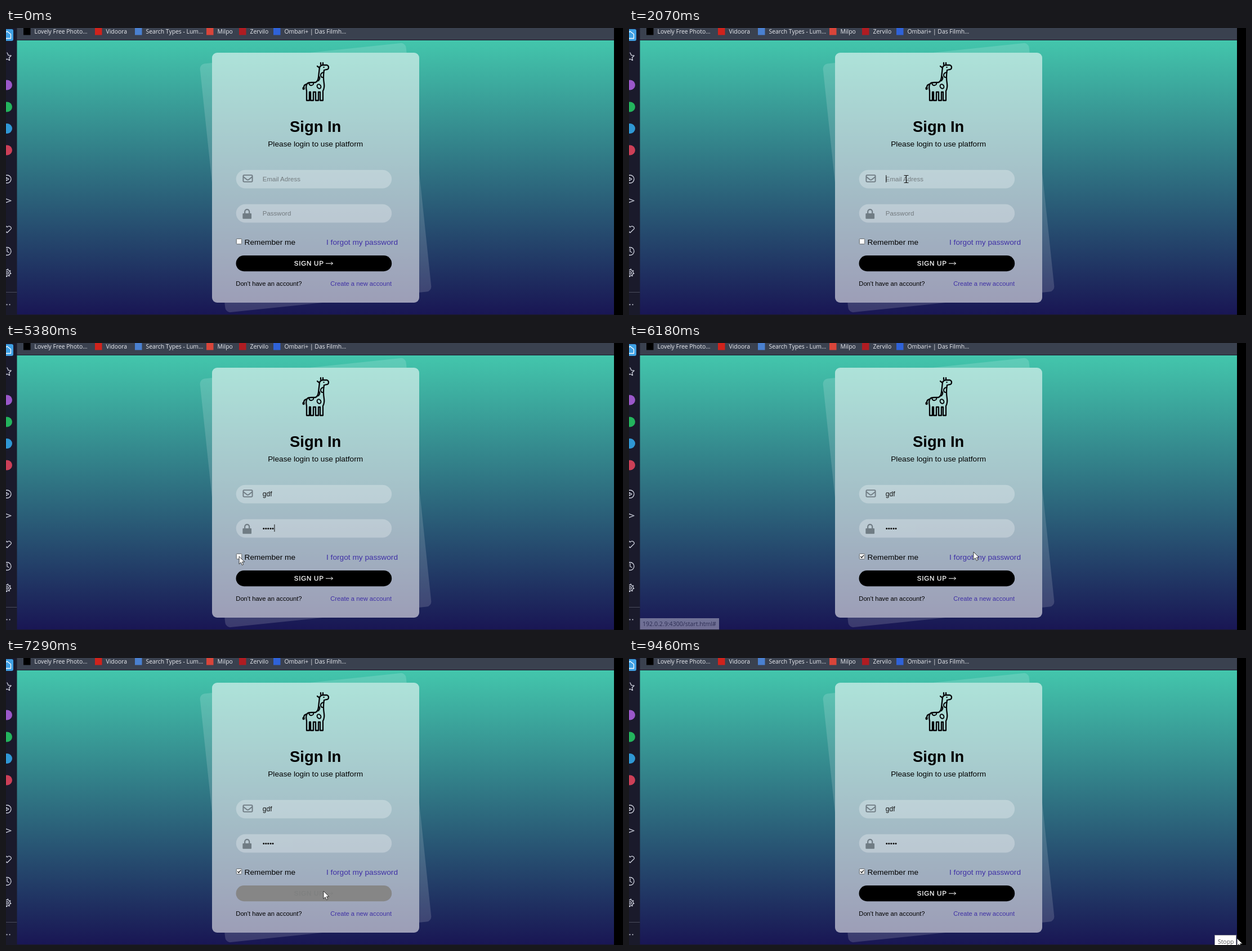
Animation, 1096 px wide and 511 px high, one loop 9560 ms. Source, as an HTML page:

```html
<!DOCTYPE html>
<html lang="en">
<head>
<meta charset="utf-8">
<title>Sign In</title>
<style>
html, body { margin: 0; width: 100%; height: 100%; overflow: hidden; background: #000; }
svg { display: block; width: 1096px; height: 511px; font-family: "Liberation Sans", Arial, sans-serif; }
.ui { font-family: "Open Sans", "Noto Sans", sans-serif; font-size: 10.4px; }
.small { font-size: 11.2px; }
.mid { font-size: 13.7px; }
.field { font-size: 11.5px; }
.hint { fill: #727a7e; }
.link { fill: #3f30a6; }
.line { fill: none; stroke: #cfd2de; stroke-width: 1.3; stroke-linejoin: round; stroke-linecap: round; }
#button { fill: #000; color: #fff; }
#button.on { fill: #868686; color: #7f8080; }
#label { fill: currentColor; stroke: currentColor; }
.link.on { text-decoration: underline; }
</style>
</head>
<body>
<svg viewBox="0 0 1096 511">
  <defs>
    <linearGradient id="sea" gradientUnits="userSpaceOnUse" x1="0" y1="22" x2="0" y2="510">
      <stop stop-color="#43c6ac"/><stop offset="1" stop-color="#191654"/>
    </linearGradient>
  </defs>

  <!-- page -->
  <rect x="19" width="1061" height="511" fill="#1a1a2b"/>
  <rect x="19" y="22" width="1061" height="488" fill="url(#sea)"/>
  <rect x="366" y="44" width="368" height="445" rx="9" fill="#fff" opacity=".15" transform="rotate(-6 550 266.5)"/>
  <rect x="366" y="44" width="368" height="445" rx="9" fill="url(#sea)"/>
  <rect x="366" y="44" width="368" height="445" rx="9" fill="#fff" opacity=".57"/>

  <!-- giraffe -->
  <g fill="none" stroke="#050508" stroke-width="2.3" stroke-linejoin="round" stroke-linecap="round">
    <path d="M557 70Q559 66 563 66L570 66Q573 67 573 70Q573 74 569 74L565 75Q563 88 565 99Q566 107 563 112V129H558V114H555V129H550V114H546V129H541V114H539V129H534V112Q532 104 535 99Q537 97 542 97H549Q554 96 555 88Z"/>
    <path d="M559 65V62M563 65V62M557 71L553 68M534 100Q529 101 529 106"/>
    <path d="M538 98Q539 103 543 102T546 98M564 79Q559 80 559 84T563 88M556 86Q559 90 555 94" stroke-width="2"/>
    <ellipse cx="556" cy="104" rx="3.2" ry="4" stroke-width="2" transform="rotate(-30 556 104)"/>
    <ellipse cx="528.6" cy="107.5" rx="1" ry="1.6"/>
    <path d="M564.5 70h.1"/>
  </g>

  <!-- form -->
  <text x="549.7" y="185.3" text-anchor="middle" font-size="27.4" font-weight="700">Sign In</text>
  <text x="549.7" y="211" text-anchor="middle" class="mid">Please login to use platform</text>
  <g fill="#fff" opacity=".27">
    <rect class="input" x="408.7" y="252.8" width="276.4" height="32.6" rx="16.3"/>
    <rect class="input" x="408.7" y="313.8" width="276.4" height="32.6" rx="16.3"/>
  </g>
  <g fill="none" stroke="#707c84" stroke-width="1.9" stroke-linejoin="round">
    <rect x="421.4" y="261.9" width="16.2" height="12" rx="1.8"/>
    <path d="M421.6 264.9L428 270Q429.5 271 431 270L437.4 264.9"/>
    <path d="M424.2 331v-3.8a4 4 0 0 1 8 0V331" stroke-width="2.2"/>
    <rect x="421.3" y="331" width="13.8" height="7.8" fill="#707c84"/>
  </g>
  <g class="field">
    <text id="mailHint" class="hint" x="455.8" y="272.6">Email Adress</text>
    <text id="passHint" class="hint" x="455.8" y="333.6">Password</text>
    <text id="mail" x="455.8" y="272.6" font-size="12" fill="#111"></text>
    <text id="pass" x="455.8" y="333.6" fill="#111"></text>
    <rect id="caret" width="1" height="13" fill="#111"/>
  </g>
  <rect x="409.3" y="375.3" width="9.4" height="9.4" rx="1" fill="#fff" stroke="#5f6468"/>
  <path id="tick" d="M411.3 380l2 2.2 3.8-4.6" fill="none" stroke="#111" stroke-width="1.3"/>
  <text x="423.5" y="386" class="mid">Remember me</text>
  <text x="569" y="386" class="mid link">I forgot my password</text>
  <g id="button">
    <rect x="408.5" y="405" width="276.7" height="28.2" rx="14.1"/>
    <g id="label">
      <text x="511.8" y="422.7" class="field" letter-spacing=".8" stroke-width=".3">SIGN UP</text>
      <path d="M568 419.2H580.4M577.4 416.6L580.6 419.2L577.4 421.8" fill="none"/>
    </g>
  </g>
  <text x="408.3" y="459" class="small">Don't have an account?</text>
  <text x="576.2" y="459" class="small link">Create a new account</text>

  <!-- status line -->
  <g id="status" class="ui">
    <rect x="19" y="490" width="141" height="20" fill="#fff"/>
    <text x="24" y="504.3" font-size="10.6" fill="#46494d">192.0.2.9:4300/start.html#</text>
  </g>

  <!-- bookmarks -->
  <rect x="19" width="1061" height="21" fill="#3a414f"/>
  <g id="marks" class="ui" fill="#e9ebf0"></g>

  <!-- sidebar -->
  <rect width="19.5" height="511" fill="#1a1a2b"/>
  <rect x="-8" y="2" width="21" height="21" rx="3" fill="#3fa0e4"/>
  <g class="line">
    <path d="M-5 11L2 6L8.5 11V18.5H-5Z" stroke="#fff"/>
    <path d="M2 44L4.2 48.6L9.2 49.2L5.5 52.7L6.5 57.6L2 55.2L-3 57.6V49"/>
    <circle cx="2" cy="269" r="7"/><path d="M0 266L5 269L0 272Z"/>
    <path d="M-6 302L9 307.5L-6 313Z"/>
    <path d="M2 364.5L-5 358V353Q-1 351 2 354.5Q5 351.5 8 354T7.6 359Z"/>
    <circle cx="2" cy="397.5" r="7"/><path d="M2 393V398L5 399.5"/>
    <circle cx="2" cy="436" r="2.2"/><circle cx="2" cy="436" r="5.4"/>
    <circle cx="2" cy="436" r="6.6" stroke-width="1.6" stroke-dasharray="2 3.2" stroke-linecap="butt"/>
    <path d="M0 470.5H19" stroke="#4a4b5c" stroke-width="1"/>
    <path d="M1.5 492.5h.1M6.5 492.5h.1" stroke-width="2"/>
  </g>
  <circle cx="2" cy="101.5" r="9" fill="#9a57c9"/>
  <circle cx="2" cy="140.5" r="9" fill="#23b45d"/>
  <circle cx="2" cy="179" r="9" fill="#2f97d4"/>
  <circle cx="2" cy="217.5" r="9" fill="#cc3f57"/>
  <rect x="1080" width="16" height="511"/>

  <!-- tooltip and pointer -->
  <g id="tip" class="ui">
    <rect x="1040.5" y="493.5" width="38" height="20" fill="#fff" stroke="#8a8a92"/>
    <text x="1046" y="509.3" fill="#5a5a5e">Stopp</text>
  </g>
  <g id="pointer" stroke-linejoin="round">
    <path id="arrow" d="M0 0V13.6L3.2 10.7L5.3 15.5L7.6 14.5L5.5 9.8H9.8Z" fill="#fff" stroke="#111" stroke-width=".8"/>
    <path id="beam" d="M-4 -6.5H-1L0 -5.7L1 -6.5H4M0 -5.7V5.7M-4 6.5H-1L0 5.7L1 6.5H4" fill="none" stroke="#111" stroke-width="1.2"/>
    <path id="hand" d="M-1.5 .8Q-1.5 -.8 0 -.8T1.5 .8V6Q3 5 4 6.3Q5.5 5.6 6.3 7Q8 6.5 8 8.5V11Q8 14 6 16H-.5Q-3 12 -4.6 9.8Q-5 8 -3.3 8L-1.5 9.8Z" fill="#fff" stroke="#111" stroke-width=".9"/>
  </g>
</svg>
<script>
const LOOP = 9560, ENTER = 510;
const FOCUS_MAIL = 2070, TYPE_G = 3070, TYPE_DF = 3300;
const FOCUS_PASS = 4170, TYPE_PASS = 4550, KEY_GAP = 80;
const BLUR = 5390, CHECK = 5470, BLINK = 535, LINGER = 160, TIP = 9240;

const $ = id => document.getElementById(id);
const all = sel => [...document.querySelectorAll(sel)];
const clamp = v => Math.max(0, Math.min(1, v));
const show = (el, on) => el.setAttribute("visibility", on ? "visible" : "hidden");

const marks = [
  [31, "#000", "Lovely Free Photo..."],
  [158, "#d0231c", "Vidoora"],
  [229, "#4a80d0", "Search Types - Lum..."],
  [356, "#d9453a", "Milpo"],
  [414, "#b01c22", "Zervilo"],
  [475, "#2f62d8", "Ombari+ | Das Filmh..."]
];
$("marks").innerHTML = marks.map(([x, fill, name]) =>
  `<rect x="${x}" width="12.5" height="12.5" fill="${fill}"/><text x="${x + 19.5}" y="10">${name}</text>`).join("");

// each glide eases to a stop; arc bows the way up (negative) or down
const entry = { x: 1075, y: 500 };
const glides = [
  { from: ENTER, to: 1450, x: 484, y: 225, arc: -225 },
  { from: 1480, to: 1920, x: 492.5, y: 269 },
  { from: 2150, to: 2460, x: 492.5, y: 275 },
  { from: 3480, to: 4230, x: 507, y: 332, arc: 40 },
  { from: 4900, to: BLUR, x: 414, y: 380 },
  { from: 5540, to: 5950, x: 630, y: 383 },
  { from: 5960, to: 6130, x: 612, y: 372 },
  { from: 6400, to: 6910, x: 564, y: 415 },
  { from: 7290, to: 7690, x: 638, y: 449.5 },
  { from: 7990, to: 8860, x: 1080, y: 499, arc: -450 }
];

function pointerAt(t) {
  let { x, y } = entry;
  for (const g of glides) {
    const u = clamp((t - g.from) / (g.to - g.from));
    const k = u * u * (3 - 2 * u);
    x += (g.x - x) * k;
    y += (g.y - y) * k + (g.arc || 0) * 4 * k * (1 - k);
  }
  return { x, y };
}

const zone = el => ({ el, box: el.getBBox() });
const hits = (p, { box }) =>
  p.x >= box.x && p.x <= box.x + box.width && p.y >= box.y && p.y <= box.y + box.height;
const inputs = all(".input").map(zone);
const links = all(".link").map(zone);
const button = zone($("button"));

// the status line lingers and fades after the pointer leaves a link
function statusAlpha(t) {
  for (let d = 0; d < LINGER; d += 5) {
    const p = pointerAt(t - d);
    if (links.some(l => hits(p, l))) return 1 - d / LINGER;
  }
  return 0;
}

function drawCaret(t, typingEnd) {
  const inPass = t >= FOCUS_PASS;
  const keys = [FOCUS_MAIL, TYPE_G, TYPE_DF, FOCUS_PASS, typingEnd];
  const since = Math.max(...keys.filter(k => k <= t));
  const text = $(inPass ? "pass" : "mail");
  $("caret").setAttribute("x", 456.3 + text.getComputedTextLength());
  $("caret").setAttribute("y", inPass ? 323 : 262);
  show($("caret"), t >= FOCUS_MAIL && t < BLUR && Math.floor((t - since) / BLINK) % 2 === 0);
}

function render(t) {
  const p = pointerAt(t);
  const inside = t >= ENTER;
  const overInput = inputs.some(z => hits(p, z));
  const overLink = links.some(z => hits(p, z));
  show($("arrow"), inside && !overInput && !overLink);
  show($("beam"), inside && overInput);
  show($("hand"), inside && overLink);
  $("pointer").setAttribute("transform", `translate(${p.x} ${p.y})`);

  for (const z of [...links, button]) z.el.classList.toggle("on", hits(p, z));
  $("status").setAttribute("opacity", statusAlpha(t));

  const typed = t < TYPE_G ? 0 : t < TYPE_DF ? 1 : 3;
  const dots = Math.max(0, Math.min(5, 1 + Math.floor((t - TYPE_PASS) / KEY_GAP)));
  $("mail").textContent = "gdf".slice(0, typed);
  $("pass").textContent = "•".repeat(dots);
  show($("mailHint"), !typed);
  show($("passHint"), !dots);
  show($("tick"), t >= CHECK);
  drawCaret(t, TYPE_PASS + 4 * KEY_GAP);
  $("tip").setAttribute("opacity", clamp((t - TIP) / 200));
}

const start = performance.now();
function frame() {
  render((performance.now() - start) % LOOP);
  requestAnimationFrame(frame);
}
frame();
</script>
</body>
</html>
```
